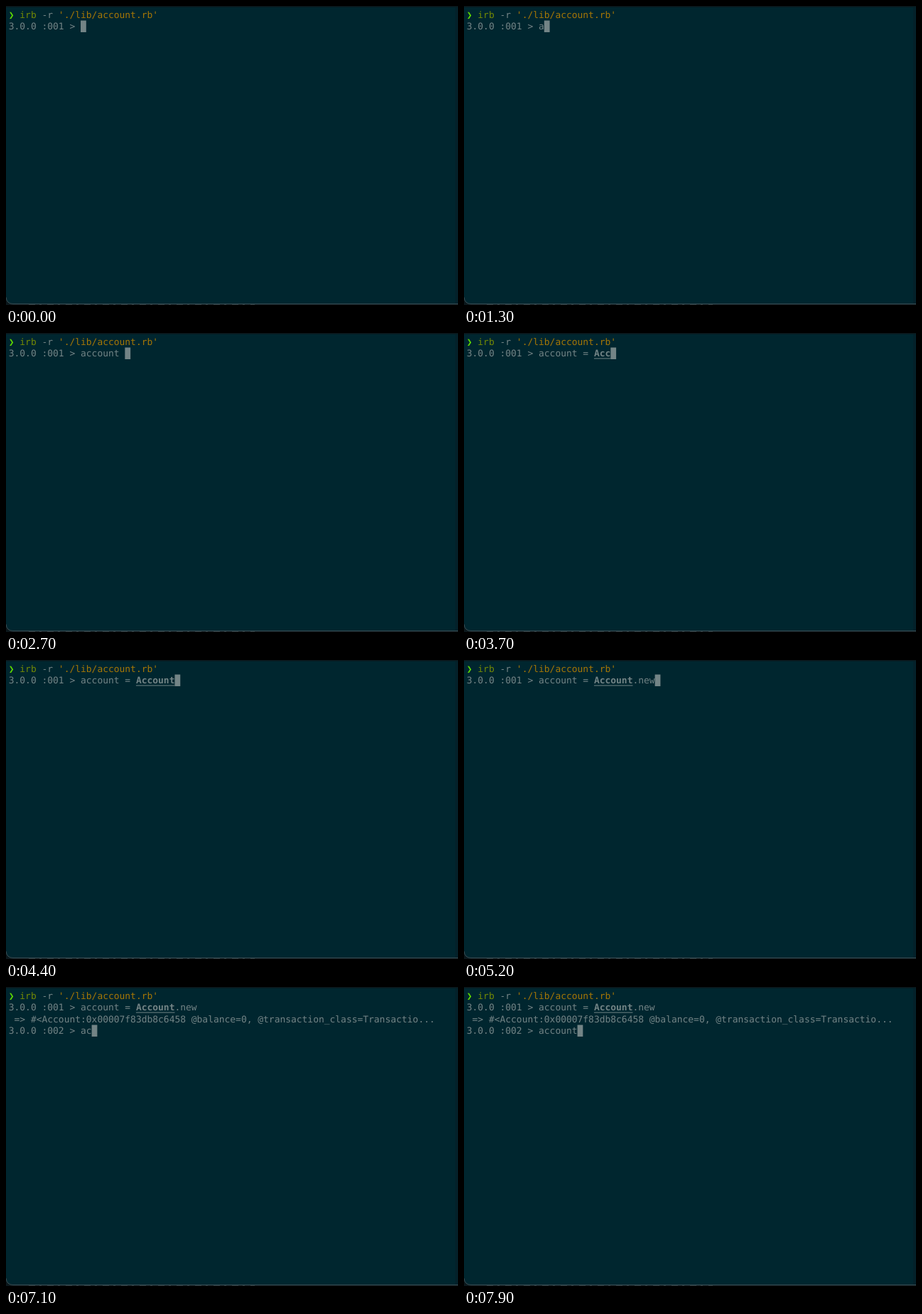
Animation of 636 by 422 pixels, one loop 8000 ms. Source, as an HTML page:

```html
<!DOCTYPE html>
<html lang="en">
<head>
<meta charset="utf-8">
<title>Terminal session</title>
<style>
  html, body { margin: 0; width: 100%; height: 100%; overflow: hidden; background: #0b171b; }
  svg { display: block; width: 636px; height: 422px; }
  text {
    font: 12.94px "DejaVu Sans Mono", "DejaVu Sans", monospace;
    fill: #738486;
    white-space: pre;
    text-rendering: geometricPrecision;
  }
  .arrow { fill: #5fdc00; }
  .command { fill: #738a05; }
  .string { fill: #a57706; }
  .constant { font-weight: bold; }
  .cursor, .underline { fill: #738486; }
</style>
</head>
<body>
<svg viewBox="0 0 636 422">
  <rect width="636" height="422" fill="#0b171b"/>
  <path d="M0 1.5H636V420.5H10Q0 420 0 411Z" fill="#00262f"/>
  <path d="M0 411Q1 420.5 10 420.5H636" fill="none" stroke="#3c4d53"/>
  <rect x="632" y="2" width="4" height="418" fill="#04212a"/>
  <path d="M32 421.5H350" stroke="#273539" stroke-dasharray="9 6 3 8"/>
  <g id="screen"></g>
</svg>
<script>
const LOOP = 8000;
const CELL = 7.79, LEFT = 3.76, ROW = 16.5, TOP = 4, BASELINE = 12.9;
const PROMPT_END = 13;
const RESULT_AT = 5900;

// Moments at which each character of an input line appears
const firstKeys = [1300, 1600, 1700, 1900, 2000, 2300, 2500, 2700, 2900, 3000, 3300,
  3600, 3700, 3900, 4000, 4300, 4400, 4700, 5000, 5100, 5200];
const secondKeys = [6800, 7100, 7200, 7400, 7500, 7700, 7900];

const screen = document.getElementById("screen");
const colX = col => LEFT + col * CELL;
const rowY = row => TOP + row * ROW;

function add(tag, attrs) {
  const node = document.createElementNS("http://www.w3.org/2000/svg", tag);
  for (const name in attrs) node.setAttribute(name, attrs[name]);
  return screen.appendChild(node);
}

function write(row, col, content, kind = "") {
  const node = add("text", { x: colX(col), y: rowY(row) + BASELINE, class: kind });
  node.textContent = content;
  return node;
}

function typed(row, col, content, kind) {
  const node = write(row, col, "", kind);
  return count => {
    const shown = Math.max(0, Math.min(content.length, count - (col - PROMPT_END)));
    node.textContent = content.slice(0, shown);
    return shown;
  };
}

write(0, 0, "❯", "arrow");
write(0, 2, "irb", "command");
write(0, 6, "-r");
write(0, 9, "'./lib/account.rb'", "string");
write(1, 0, "3.0.0 :001 >");

const variable = typed(1, 13, "account = ");
const constant = typed(1, 23, "Account", "constant");
const method = typed(1, 30, ".new");
const underline = add("rect", { x: colX(23), y: rowY(1) + 15, height: 1, class: "underline" });

const result = [
  write(2, 1, "=> #<Account:0x00007f83db8c6458 @balance=0, @transaction_class=Transactio..."),
  write(3, 0, "3.0.0 :002 >")
];
const nextInput = typed(3, 13, "account");
const cursor = add("rect", { width: CELL, height: ROW, class: "cursor" });

const countKeys = (keys, time) => keys.filter(key => key <= time).length;

function draw(time) {
  const first = countKeys(firstKeys, time);
  const second = countKeys(secondKeys, time);
  const done = time >= RESULT_AT;

  variable(first);
  underline.setAttribute("width", constant(first) * CELL);
  method(first);
  nextInput(second);
  for (const line of result) line.setAttribute("visibility", done ? "visible" : "hidden");

  cursor.setAttribute("x", colX(PROMPT_END + (done ? second : first)));
  cursor.setAttribute("y", rowY(done ? 3 : 1));
}

const start = performance.now();
function tick() {
  draw((performance.now() - start) % LOOP);
  requestAnimationFrame(tick);
}
tick();
</script>
</body>
</html>
```
